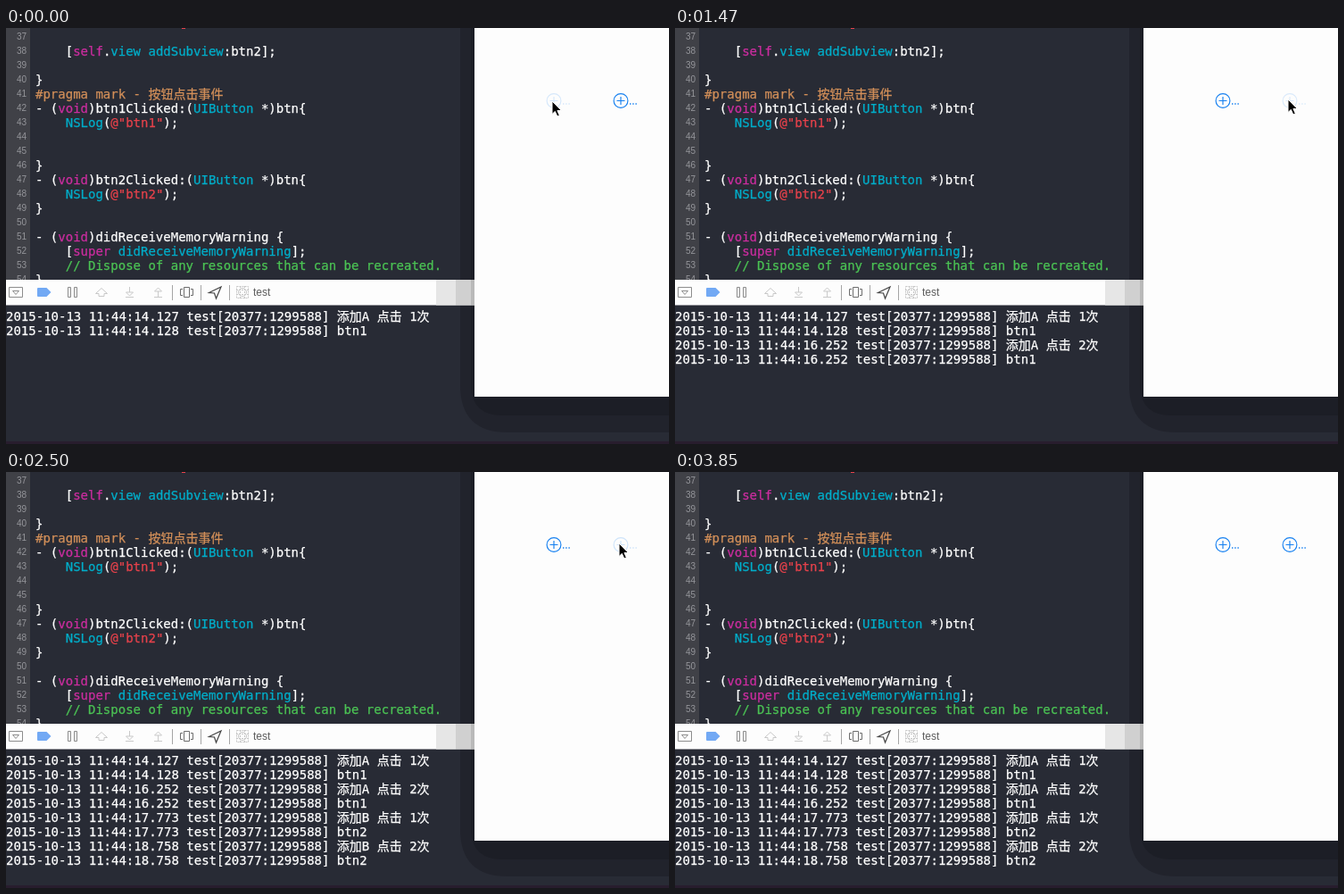
Write an HTML page that moves like this. It is 743 by 466 pixels and loops after 4.32 s.

```html
<!DOCTYPE html>
<html lang="zh-CN">
<head>
<meta charset="utf-8">
<title>Button click log</title>
<style>
  html, body { margin: 0; width: 100%; height: 100%; overflow: hidden; background: #282b35; }
  #stage { position: relative; width: 743px; height: 466px; overflow: hidden; background: #282b35; }
  #stage > * { position: absolute; }
  #editor { left: 0; top: 0; width: 743px; height: 282px; overflow: hidden; }
  #editor > * { position: absolute; }
  #gutter { left: 0; top: 0; width: 27px; height: 282px; background: #404147; }
  pre {
    margin: 0; color: #fff; white-space: pre;
    font: 14px/16px "DejaVu Sans Mono", "Noto Sans CJK SC", "Noto Sans CJK", monospace;
    font-variant-ligatures: none;
    -webkit-text-stroke: .25px currentColor;
  }
  #code { left: 33px; top: 2px; }
  #numbers {
    left: 0; top: 2px; width: 23px; text-align: right; color: #95969b;
    font: 10px/16px "Liberation Sans", sans-serif; -webkit-text-stroke: 0;
  }
  #console { left: 0; top: 315px; }
  .key { color: #cb2d9f; }
  .type { color: #00aeca; }
  .str { color: #e7424b; }
  .note { color: #4bc354; }
  .mark { color: #d28f59; }
  svg { left: 0; top: 0; }
</style>
</head>
<body>
<div id="stage">
  <div id="editor">
    <div id="gutter"></div>
    <pre id="numbers"></pre>
    <pre id="code">

    [<span class="key">self</span>.<span class="type">view</span> <span class="type">addSubview</span>:btn2];

}
<span class="mark">#pragma mark - 按钮点击事件</span>
- (<span class="key">void</span>)btn1Clicked:(<span class="type">UIButton</span> *)btn{
    <span class="type">NSLog</span>(<span class="str">@"btn1"</span>);


}
- (<span class="key">void</span>)btn2Clicked:(<span class="type">UIButton</span> *)btn{
    <span class="type">NSLog</span>(<span class="str">@"btn2"</span>);
}

- (<span class="key">void</span>)didReceiveMemoryWarning {
    [<span class="key">super</span> <span class="type">didReceiveMemoryWarning</span>];
    <span class="note">// Dispose of any resources that can be recreated.</span>
}</pre>
  </div>

  <svg width="743" height="466" viewBox="0 0 743 466" fill="none">
    <defs>
      <g id="plus">
        <circle r="7.9"/>
        <path d="M-4.5 0H4.5M0 -4.5V4.5"/>
        <path d="M10 3.5h1.4m1.8 0h1.4m1.8 0h1.4" stroke-width="1.4"/>
      </g>
    </defs>

    <!-- leftovers of the scrolled-off line -->
    <path d="M197 .5h4" stroke="#e7424b"/>
    <path d="M512 .5h2m4 0h2" stroke="#b9bac0"/>

    <!-- simulator shadow and window -->
    <path d="M509 0V400Q509 453 562 453H743V0Z" fill="#21232c"/>
    <path d="M521 0V402Q523 434 556 434H743V0Z" fill="#1c1e26"/>
    <path d="M0 464.5H743" stroke="#281d2e" stroke-width="3"/>

    <!-- debug bar -->
    <path d="M0 282H525V310.5H0Z" fill="#fdfdfd"/>
    <path d="M482 282h22v28.5h-22z" fill="#e6e6e6"/>
    <path d="M504 282h17v28.5h-17z" fill="#d0d0d0"/>
    <path d="M521 282h4v28.5h-4z" fill="#b9b9b9"/>
    <path d="M525 0H743V413H525Z" fill="#fdfdfd"/>

    <g stroke="#8d8d8d">
      <path d="M3.5 290.5h15v11h-15zM7.5 294.5h7l-3.5 4z"/>
      <path d="M69.5 290.5h3v11h-3zM76.5 290.5h3v11h-3z"/>
      <path d="M186.500 288v17M218.500 288v17M250.500 288v17" stroke="#a5a5a5"/>
    </g>
    <path d="M36 291h9.500l5 5-5 5H36q-1 0-1-1v-8q0-1 1-1z" fill="#72a9f4"/>
    <g stroke="#c9c9c9">
      <path d="M100.500 297.500l6.500-6 6.500 6h-3.500v3h-6v-3z"/>
      <path d="M138.500 290v6m-4 0h8l-4 4zM134 301.500h9"/>
      <path d="M170.500 301v-6m-4 0h8l-4-4zM166 301.500h9"/>
    </g>
    <g stroke="#6d6d6d">
      <path d="M199.500 290.500h6v11h-6zM198 292.500h-2.500v7h2.500M207 292.500h2.500v7h-2.500"/>
      <path d="M227.500 296.500l13.500-6.500-5.500 13-2-6z" stroke="#444" stroke-width="1.2"/>
    </g>
    <g stroke="#c6c6c6">
      <path d="M258.500 289.500h13v13h-13zM262.500 289v14M267.500 289v14M258 293.500h14M258 298.500h14" stroke-dasharray="2 1"/>
      <circle cx="265" cy="296" r="4.500"/>
    </g>
    <text x="277" y="300" font-size="12" font-family="Liberation Sans, sans-serif" fill="#5c5c5c">test</text>

    <g stroke="#1680f0" stroke-width="1.15">
      <use id="buttonA" href="#plus" x="614" y="81.500"/>
      <use id="buttonB" href="#plus" x="689" y="81.500"/>
    </g>
    <path id="cursor" d="M0 0V14.500L3.300 11.400 5.800 17 8.300 15.900 5.900 10.500H10.500Z"
      fill="#000" stroke="#fff" stroke-width="1"/>
  </svg>
  <pre id="console"></pre>
</div>

<script>
const LOOP = 4320;
const $ = id => document.getElementById(id);

// Each track holds its value until the next key: [time, ...values]
const cursorTrack = [
  [0, 612, 82], [440, 632, 83], [590, 667, 82], [730, 670, 80], [880, 675, 80],
  [1020, 681, 79], [1170, 686, 81], [1320, 687, 80], [3100, 687, 201],
  [3250, 688, 244], [3400, 697, 299], [3550, 712, 441], [3700, 712, 465], [3850, 712, 500]
];
const fadeA = [[0, .17], [140, .45], [290, .88], [440, 1]];
const fadeB = [
  [0, 1], [1470, .15], [1610, .4], [1760, .85], [1910, 1],
  [2500, .2], [2650, .6], [2800, 1]
];
const clicks = [
  { at: 0, stamps: ['14.127', '14.128'], label: '添加A 点击 1次', name: 'btn1' },
  { at: 140, stamps: ['16.252', '16.252'], label: '添加A 点击 2次', name: 'btn1' },
  { at: 1610, stamps: ['17.773', '17.773'], label: '添加B 点击 1次', name: 'btn2' },
  { at: 2500, stamps: ['18.758', '18.758'], label: '添加B 点击 2次', name: 'btn2' }
];

const valueAt = (track, t) => track.findLast(key => key[0] <= t).slice(1);
const logLine = (stamp, text) => `2015-10-13 11:44:${stamp} test[20377:1299588] ${text}\n`;
const logAt = t => clicks.filter(c => c.at <= t)
  .map(c => logLine(c.stamps[0], c.label) + logLine(c.stamps[1], c.name)).join('');

// The parser drops the first newline of a pre, so the blank line 37 is kept by the second one.
$('numbers').textContent = Array.from({ length: 18 }, (_, i) => 37 + i).join('\n');

let shownLog = '';
function draw(t) {
  const [x, y] = valueAt(cursorTrack, t);
  $('cursor').setAttribute('transform', `translate(${x} ${y})`);
  $('buttonA').setAttribute('opacity', valueAt(fadeA, t)[0]);
  $('buttonB').setAttribute('opacity', valueAt(fadeB, t)[0]);
  const log = logAt(t);
  if (log !== shownLog) $('console').textContent = shownLog = log;
}

const start = performance.now();
function tick() {
  draw((performance.now() - start) % LOOP);
  requestAnimationFrame(tick);
}
tick();
</script>
</body>
</html>
```
